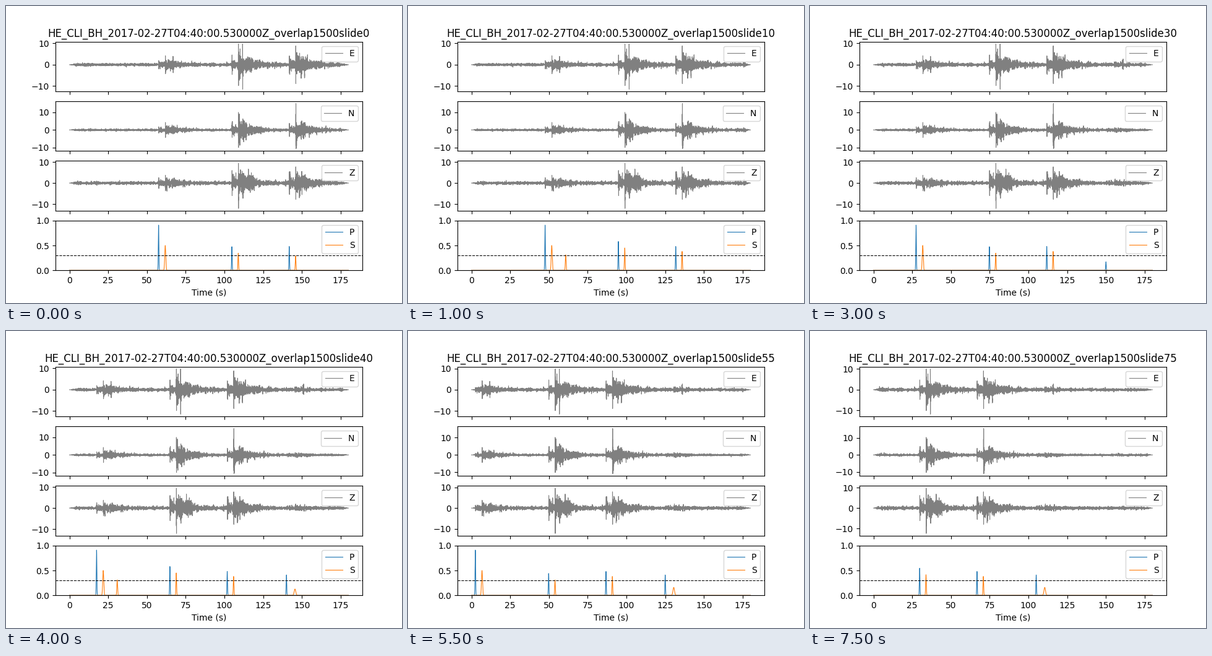
A matplotlib script that plays this animation: 640 by 480 pixels, repeating every 8000 ms.

```python
import numpy as np
import matplotlib.pyplot as plt
from matplotlib.animation import FuncAnimation

RATE, SPAN, STEP, FRAMES = 100, 180, 5, 16
TITLE = "HE_CLI_BH_2017-02-27T04:40:00.530000Z_overlap1500slide{}"
T = np.arange(SPAN * RATE + 1) / RATE
FULL = np.arange((SPAN + STEP * FRAMES) * RATE + 1) / RATE
TAPER = np.sin(np.pi / 2 * np.clip(np.minimum(T, SPAN - T) / 5, 0, 1)) ** 2

# P time, S time, size, P score, S score, score swing, S pick width
EVENTS = [
    (57.5, 61.8, 0.43, 0.91, 0.50, 0.00, 0.33),
    (104.8, 108.9, 1.00, 0.51, 0.38, 0.07, 0.21),
    (141.8, 145.9, 0.90, 0.48, 0.38, 0.00, 0.21),
    (180.0, 185.5, 0.13, 0.41, 0.16, 0.00, 0.50),
]
# noise level, P and S amplitude, time of the largest swing, axis limits
CHANNELS = {
    "E": (0.65, 2.3, 4.9, 111.7, -12.48, 10.81),
    "N": (0.55, 2.1, 5.0, 146.1, -11.99, 16.30),
    "Z": (0.70, 3.0, 4.3, 109.0, -13.14, 10.53),
}


def burst(onset, decay):
    age = FULL - onset
    return (age >= 0) * np.exp(-(np.maximum(age, 0) / decay) ** 1.3)


def kick(wave, t, down, up):
    i = round(t * RATE)
    wave[i], wave[i + 6] = up, down


def seismogram(rng, base, p_amp, s_amp, peak, low, high):
    noise = np.convolve(rng.standard_normal(FULL.size), np.hanning(7), "same")
    knots = np.arange(0, FULL[-1] + 1, 0.5)
    swell = np.interp(FULL, knots, np.exp(0.3 * rng.standard_normal(knots.size)))
    env = base + sum(size * (p_amp * burst(tp, 6) + s_amp * burst(ts, 11))
                     for tp, ts, size, *_ in EVENTS)
    pad = 0.05 * (high - low) / 1.1
    wave = np.clip(noise / (2.7 * noise.std()) * swell * env,
                   0.85 * low, 0.85 * high)
    for tp, ts, size, *_ in EVENTS:
        for t, amp in ((tp, p_amp), (ts, s_amp)):
            kick(wave, t + 0.1, -2 * amp * size, 2 * amp * size)
    kick(wave, peak, low + pad, high - pad)
    return wave


def spike(t, height, width):
    return height * np.exp(-0.5 * ((T - t) / width) ** 2)


def picks(slide):
    """P and S scores; a pick gains strength as it moves away from the right edge."""
    swing = np.cos(2 * np.pi * (slide - 10) / 30)
    p = np.zeros_like(T)
    s = spike(70.8 - slide, 0.31 * max(0, 2 * swing - 1), 0.24)
    for tp, ts, _, p_top, s_top, sway, width in EVENTS:
        p_seen, s_seen = np.clip((SPAN - 25 + slide - np.array([tp, ts])) / 12, 0, 1)
        p += spike(tp - slide, (p_top + sway * swing) * p_seen, 0.18)
        s += spike(ts - slide, (s_top + sway * swing) * s_seen, width)
    return p, s


rng = np.random.default_rng(4)
waves = {name: seismogram(rng, *spec) for name, spec in CHANNELS.items()}

fig, axes = plt.subplots(4, 1, sharex=True, figsize=(6.4, 4.8), dpi=100)
traces = {}
for ax, name in zip(axes, waves):
    traces[name], = ax.plot(T, 0 * T, color="gray", lw=0.8, label=name)
    ax.legend(loc="upper right")

prob = axes[3]
p_line, = prob.plot(T, 0 * T, color="C0", lw=0.8, label="P")
s_line, = prob.plot(T, 0 * T, color="C1", lw=0.8, label="S")
prob.axhline(0.3, color="black", ls="--", lw=0.8)
prob.legend(loc="upper right")
prob.set_ylim(0, 1)
prob.set_xlim(-9, 189)
prob.set_xlabel("Time (s)")
title = axes[0].set_title(TITLE.format(0))


def update(k):
    slide = k * STEP
    start = slide * RATE
    title.set_text(TITLE.format(slide))
    # amplitudes are normalised, so they grow once the first event has left
    gain = 1 + 0.033 * np.clip((slide - 50) / 15, 0, 1)
    for ax, name in zip(axes, waves):
        traces[name].set_ydata(waves[name][start:start + T.size] * TAPER * gain)
        low, high = CHANNELS[name][-2:]
        ax.set_ylim(low * gain, high * gain)
    p, s = picks(slide)
    p_line.set_ydata(p)
    s_line.set_ydata(s)
    return [*traces.values(), p_line, s_line, title]


anim = FuncAnimation(fig, update, frames=FRAMES, interval=500,
                     repeat=True, repeat_delay=0, blit=False)
plt.show()
```
